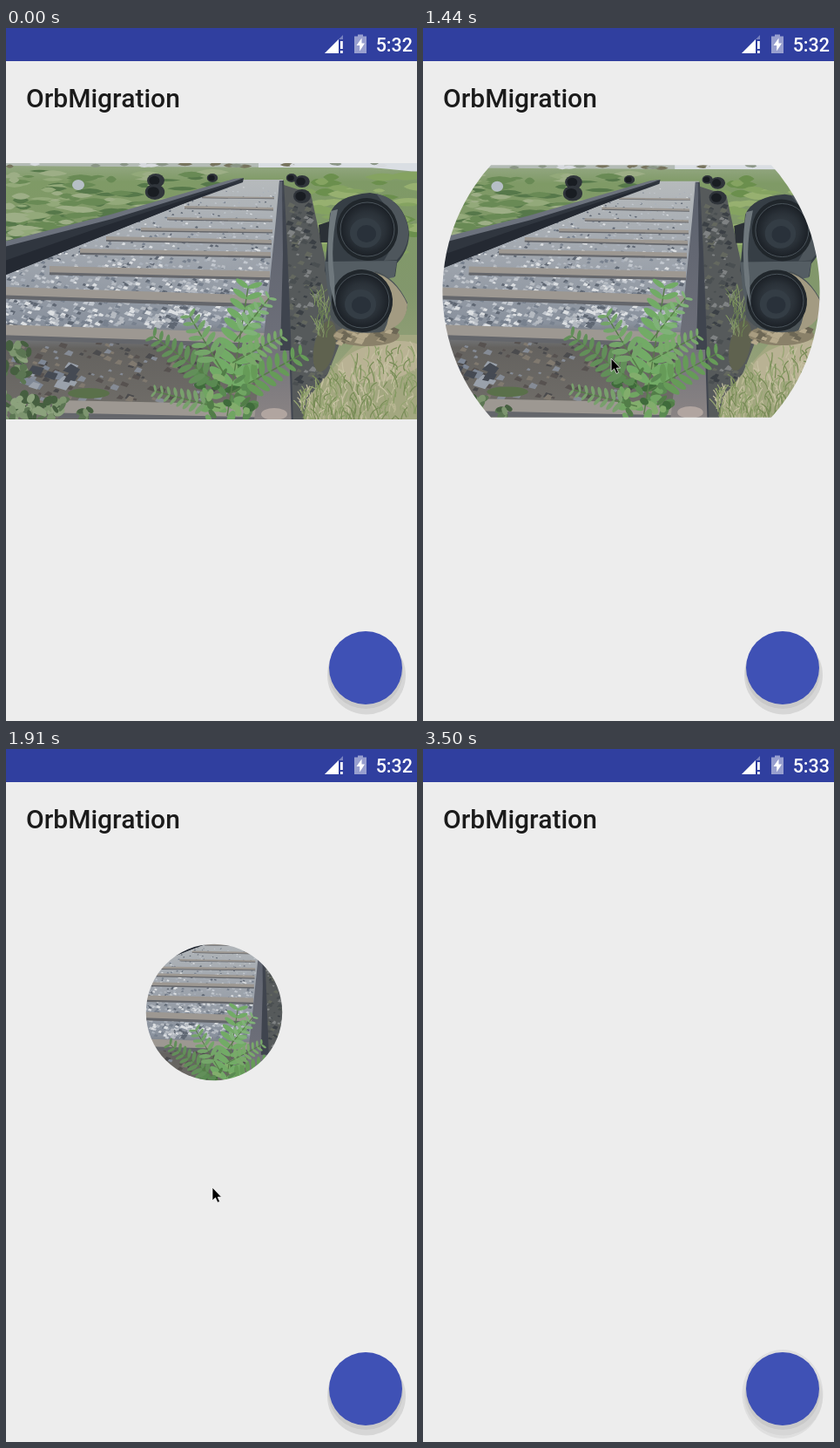
Animation, 472 px wide and 795 px high, one loop 4.02 s. Source, as an HTML page:

```html
<!DOCTYPE html>
<html lang="en">
<head>
<meta charset="utf-8">
<title>OrbMigration</title>
<style>
html, body { margin: 0; width: 100%; height: 100%; overflow: hidden; background: #ededed; }
svg { display: block; width: 472px; height: 795px; }
text { font-family: Roboto, sans-serif; font-weight: 500; }
</style>
</head>
<body>
<svg viewBox="0 0 472 795">
  <defs>
    <clipPath id="frame"><rect y="155" width="472" height="294"/></clipPath>
    <clipPath id="round"><circle id="hole" r="600"/></clipPath>
    <filter id="soft" filterUnits="userSpaceOnUse" x="-10" y="145" width="492" height="314">
      <feGaussianBlur stdDeviation=".7"/>
    </filter>
    <linearGradient id="field" x1="0" y1="0" x2="0" y2="1">
      <stop offset="0" stop-color="#9fae92"/><stop offset=".1" stop-color="#7f9a66"/>
      <stop offset=".5" stop-color="#82976c"/><stop offset="1" stop-color="#a3a884"/>
    </linearGradient>
    <linearGradient id="bed" x1="0" y1="0" x2="0" y2="1">
      <stop offset="0" stop-color="#b6babc"/><stop offset=".3" stop-color="#a0a6ae"/>
      <stop offset=".58" stop-color="#89919d"/><stop offset=".68" stop-color="#64625f"/>
      <stop offset="1" stop-color="#73706b"/>
    </linearGradient>
    <linearGradient id="steel" x1="0" y1="0" x2="0" y2="1">
      <stop offset="0" stop-color="#5b616d"/><stop offset=".6" stop-color="#6c6e78"/>
      <stop offset="1" stop-color="#8d8685"/>
    </linearGradient>
    <radialGradient id="lens">
      <stop offset="0" stop-color="#3a434b"/><stop offset=".65" stop-color="#2a3138"/>
      <stop offset="1" stop-color="#1b2026"/>
    </radialGradient>
  </defs>
  <rect width="472" height="795" fill="#ededed"/>
  <rect width="472" height="38" fill="#303f9f"/>
  <g fill="#fff">
    <path d="M366 29L387 8V13H382V29Z" opacity=".35"/>
    <path d="M366 29L382 13V29ZM384 15h2.800v9H384ZM384 26h2.800v3H384Z"/>
    <path d="M400 9.500h4V7.500h6v2h4V29H400Z" opacity=".5"/>
    <path d="M408.500 11.500L402.500 20H406.200V26.500L412 17.500H408.500Z"/>
    <text id="clock" x="467" y="27" font-size="21.500" text-anchor="end">5:32</text>
  </g>
  <text x="23" y="91" font-size="30" fill="#1b1b1b">OrbMigration</text>
  <g id="ball" clip-path="url(#round)"><g id="zoom"><g clip-path="url(#frame)"><g id="photo" filter="url(#soft)"></g></g></g></g>
  <ellipse id="lift" cx="413" cy="740" rx="46.500" ry="51" opacity="0"/>
  <circle cx="414" cy="742.500" r="45" fill="#d6d6d6"/>
  <circle cx="413" cy="738" r="43" fill="#c9c9c9"/>
  <circle cx="413" cy="734" r="42" fill="#3f51b5"/>
  <path id="cursor" d="M0 0V15L3.500 11.800L6 17.300L8.500 16.200L6.200 11H10.500Z" fill="#000" stroke="#fff" stroke-width=".7"/>
</svg>
<script>
const $ = id => document.getElementById(id);
const photo = $('photo');

let seed = 7;
const rnd = (a = 1, b = 0) => {
  seed = (seed * 16807) % 2147483647;
  return b + (a - b) * seed / 2147483647;
};
const pick = list => list[Math.floor(rnd(list.length))];
const fix = v => v.toFixed(1);

function add(tag, attrs) {
  const el = document.createElementNS('http://www.w3.org/2000/svg', tag);
  for (const k in attrs) el.setAttribute(k, attrs[k]);
  photo.append(el);
}
const shape = (d, fill) => add('path', { d, fill });
const blob = (cx, cy, rx, ry, fill, turn = 0) =>
  add('ellipse', { cx, cy, rx, ry, fill, transform: `rotate(${turn} ${cx} ${cy})` });

// Gathers many small pieces into one path per colour.
function scatter(n, colors, piece, stroke) {
  const paths = colors.map(() => '');
  for (let i = 0; i < n; i++) paths[i % colors.length] += piece();
  paths.forEach((d, i) => add('path', stroke
    ? { d, fill: 'none', stroke: colors[i], 'stroke-width': stroke, 'stroke-linecap': 'round' }
    : { d, fill: colors[i] }));
}

function stone(x, y, s) {
  return `M${fix(x - s)} ${fix(y + rnd(s * .4))}L${fix(x - s * rnd(.5))} ${fix(y - s * .7)}` +
    `L${fix(x + s)} ${fix(y - s * rnd(.4))}L${fix(x + s * .5)} ${fix(y + s * .6)}Z`;
}
const patch = (x, y, w, h) =>
  `M${fix(x)} ${fix(y)}q${fix(w / 2)} ${fix(-h * 1.4)} ${fix(w)} 0q${fix(-w / 2)} ${fix(h * 1.4)} ${fix(-w)} 0`;

function blade(x, y, len) {
  return `M${fix(x)} ${fix(y)}q${fix(rnd(4, -4))} ${fix(-len * .6)} ${fix(rnd(9, -9))} ${fix(-len)}`;
}

// A stem with paired leaflets that shrink towards its tip.
function frond(x0, y0, x1, y1, n, size, fill) {
  const a = Math.atan2(y1 - y0, x1 - x0), deg = a * 180 / Math.PI;
  add('path', { d: `M${x0} ${y0}L${x1} ${y1}`, stroke: '#587c4a', 'stroke-width': 1.5 });
  for (let i = 0; i <= n; i++) {
    const k = .25 + .75 * i / n, s = size * (1.1 - .6 * k);
    for (const side of [-1, 1]) {
      const b = a + side * 1.1;
      blob(x0 + (x1 - x0) * k + Math.cos(b) * s, y0 + (y1 - y0) * k + Math.sin(b) * s,
        s, s * .36, fill, deg + side * 63);
    }
  }
}

function drawPhoto() {
  add('rect', { x: -10, y: 145, width: 492, height: 314, fill: 'url(#field)' });
  shape('M-10 145H482V161L350 160L120 159L-10 158Z', '#b3bbb5');
  shape('M290 145H482V166L420 160H290Z', '#dadee3');
  scatter(20, ['#77745e', '#8b9687', '#d7dade'], () => patch(rnd(460), rnd(159, 155), rnd(18, 5), 3));
  scatter(150, ['#56784a', '#93a97a', '#698a55', '#9dae86'], () => {
    const y = rnd(245, 164);
    return patch(rnd(270 - (y - 164) * 2.6, -10), y, rnd(40, 12), rnd(6, 2));
  });
  scatter(70, ['#6b8f4d', '#97b070', '#85a361'], () => patch(rnd(460, 340), rnd(260, 168), rnd(44, 14), rnd(8, 3)));
  blob(83, 180, 7, 6, '#b6bfc6');

  shape('M271 174H318L326 459H-10V270L120 226Z', 'url(#bed)');
  scatter(1100, ['#c3c8cf', '#5f6773', '#a9b0ba', '#78818e', '#dcdfe2', '#b5bac1'], () => {
    const y = 177 + 166 * Math.sqrt(rnd()), left = Math.max(-4, 268 - (y - 178) * 2.65);
    return stone(rnd(313 - (y - 175) * .1, left), y, .8 + (y - 175) / 52 * rnd(1.2, .6));
  });
  scatter(150, ['#4b4b4d', '#80796f', '#858b95', '#575250'], () => stone(rnd(290), rnd(430, 360), rnd(6, 2)));
  scatter(20, ['#7e8795', '#9aa1ab', '#454a53'], () => stone(rnd(80, 8), rnd(415, 375), rnd(10, 4)));

  // Sleepers: left end, top at the left, right end, top at the right, thickness.
  const beams = [[225, 193, 308, 194, 2], [205, 204, 307, 206, 3], [185, 217, 306, 219, 3],
    [155, 229, 306, 231, 4], [115, 239, 305, 243, 5], [85, 253, 304, 257, 6],
    [50, 273, 303, 279, 9], [0, 297, 302, 307, 12], [-10, 340, 298, 350, 15], [60, 427, 290, 432, 18]];
  for (const [x, y, x2, y2, h] of beams) {
    shape(`M${x} ${y}L${x2} ${y2}v${h}L${x} ${y + h}Z`, '#9d9892');
    shape(`M${x} ${y + h * .8}L${x2} ${y2 + h * .8}v${h * .35}L${x} ${y + h * 1.15}Z`, '#64666b');
  }
  blob(95, 419, 24, 6, '#5a704a');

  shape('M273 172L262 174L120 215L-10 250V287L110 239L200 203L272 177Z', '#30363f');
  shape('M273 172L262 173L120 214L-10 247V253L122 219L262 176Z', '#6c727d');
  shape('M-10 270L110 228L270 176L200 203L110 239L-10 287Z', '#242932');

  shape('M319 180L350 190L374 300L388 350L345 459H325Z', '#565a5b');
  scatter(150, ['#3b4045', '#7f8283', '#64685f', '#4a4f51'], () => {
    const y = rnd(420, 195);
    return stone(rnd(348 + (y - 200) * .12, 325), y, rnd(5, 1.5));
  });
  shape('M314 175H319L323 250L327 350L330 459H313L309 340L312 240Z', '#414650');
  shape('M314 175L317 176L321 260L325 360L328 459H284L292 390L302 300L310 220Z', 'url(#steel)');
  shape('M317 178L322 260L327 370H315L318 260Z', '#3f444e');
  blob(308, 443, 15, 7, '#b1a5a0');

  shape('M340 459L346 425L380 385L410 352H482V459Z', '#a3a780');
  blob(432, 383, 52, 22, '#b9b294', -12);
  blob(366, 365, 12, 30, '#5f624f', 12);
  scatter(330, ['#bab894', '#879b64', '#c6c1a2', '#96a572', '#788c56'], () => {
    const x = rnd(472, 338);
    return blade(x, rnd(456, Math.max(372, 425 - (x - 338) * .6)), rnd(18, 6));
  }, 1.2);
  scatter(34, ['#6f8853', '#859868'], () => blade(rnd(372, 354), rnd(355, 310), rnd(26, 9)), 1);

  for (const [x, y, r] of [[172, 175, 8], [171, 188, 9], [237, 172, 5], [340, 176, 7], [340, 193, 8], [328, 172, 5]]) {
    blob(x, y, r * 1.25, r, '#30353b');
    blob(x - r * .2, y, r * .75, r * .65, '#191d22');
  }

  blob(414, 353, 38, 12, '#8a8169');
  scatter(24, ['#a89c80', '#6d6755', '#b5a98c'], () => stone(rnd(446, 380), rnd(362, 346), rnd(7, 3)));
  shape('M359 226L371 222V246H361Z', '#2b3036');
  shape('M372 213Q380 192 418 189Q452 193 461 224Q468 248 449 270L447 285L372 297L366 278Z', '#363e45');
  shape('M425 190Q452 195 461 225Q466 248 449 266L434 267Q452 240 442 212Z', '#4e565c');
  shape('M366 268L449 267L446 286L398 294L374 322L369 300Z', '#545d63');
  shape('M425 279Q447 286 461 315Q461 340 430 349Q382 354 372 329L374 300Z', '#4b5357');
  shape('M421 280Q447 286 461 317Q460 341 434 348Q451 315 421 280Z', '#a39b82');
  for (const [x, y] of [[415, 231], [409, 313]]) {
    blob(x, y, 35, 36, '#20262b', -15);
    add('circle', { cx: x, cy: y, r: 31, fill: 'url(#lens)', stroke: '#4b545b', 'stroke-width': 1 });
    blob(x - 2, y + 4, 18, 17, '#343d45');
    blob(x - 1, y + 5, 11, 10, '#29313a');
  }
  shape('M373 210Q367 250 372 295L378 320L377 285Q372 250 381 208Z', '#6f787d');

  const greens = ['#5a8a52', '#70a562', '#3f6b3b', '#527d48', '#82ad6c'];
  for (let i = 0; i < 46; i++)
    blob(rnd(284, 222), rnd(449, 382), rnd(10, 4), rnd(5, 2.5), pick(greens), rnd(180));
  frond(254, 445, 278, 298, 9, 17, '#72ab66');
  frond(248, 412, 170, 354, 8, 11, '#628f59');
  frond(250, 396, 211, 331, 6, 11, '#74a569');
  frond(256, 420, 338, 375, 7, 12, '#669b58');
  frond(260, 384, 316, 354, 6, 9, '#79a96a');
  frond(246, 436, 172, 417, 7, 8, '#78a06c');
  frond(262, 360, 302, 310, 5, 9, '#80b278');
  for (let i = 0; i < 14; i++)
    blob(rnd(276, 232), rnd(449, 395), rnd(8, 4), rnd(4, 2), pick(greens), rnd(180));

  const leaves = ['#5c7653', '#7d956f', '#465f40', '#8ca27d'];
  for (let i = 0; i < 55; i++) blob(rnd(66, -4), rnd(449, 421), rnd(9, 4), rnd(5, 2), pick(leaves), rnd(180));
  for (let i = 0; i < 28; i++) blob(rnd(28, -4), rnd(410, 362), rnd(9, 4), rnd(5, 2), pick(leaves), rnd(180));
  for (let i = 0; i < 8; i++) blob(rnd(100, 84), rnd(449, 435), 5, 3, pick(leaves), rnd(180));
}

const LOOP = 4020, STEP = 1000 / 17;
const clamp = v => Math.min(1, Math.max(0, v));
const ease = u => (1 - Math.cos(Math.PI * clamp(u))) / 2;
const bezier = (a, b, c, u) => a * (1 - u) ** 2 + 2 * b * u * (1 - u) + c * u * u;

// Pointer stops: time, x, y.
const stops = [[500, 146, 835], [660, 124, 680], [780, 114, 570], [880, 160, 480],
  [980, 236, 395], [1080, 218, 347], [1340, 218, 347], [1560, 214, 416],
  [1700, 222, 459], [1880, 237, 503], [2560, 237, 503], [2800, 281, 565],
  [2970, 307, 606], [3029, 311, 613], [3220, 300, 680], [3430, 273, 800]];

function along(keys, t) {
  const i = keys.findIndex(k => k[0] > t);
  if (i < 1) return null;
  const [t0, x0, y0] = keys[i - 1], [t1, x1, y1] = keys[i];
  const u = (t - t0) / (t1 - t0);
  return [x0 + (x1 - x0) * u, y0 + (y1 - y0) * u];
}

function render(now) {
  const t = 560 + Math.floor((now % LOOP - 553) / STEP) * STEP;

  const radius = t < 1375 ? 600 : Math.max(19.5, 182 - .294 * (t - 1560));
  const scale = 1 - .65 * ease((t - 1318) / 1300);
  const move = ease((t - 2164) / 1298);
  const x = bezier(239, 371, 413, move), y = bezier(302, 520, 734, move);
  const hole = $('hole');
  hole.setAttribute('cx', x);
  hole.setAttribute('cy', y);
  hole.setAttribute('r', radius);
  $('zoom').setAttribute('transform',
    `translate(${x - 3} ${y}) scale(${scale}) translate(-236 -302)`);
  $('ball').setAttribute('visibility', t < 3480 ? 'visible' : 'hidden');
  $('lift').setAttribute('opacity', t > 3480 ? .06 : 0);
  $('clock').textContent = t < 2700 ? '5:32' : '5:33';

  const p = t < 555 ? null : along(stops, t);
  $('cursor').setAttribute('visibility', p ? 'visible' : 'hidden');
  if (p) $('cursor').setAttribute('transform', `translate(${fix(p[0])} ${fix(p[1])})`);
}

drawPhoto();
const start = performance.now();
function tick() {
  render(performance.now() - start);
  requestAnimationFrame(tick);
}
tick();
</script>
</body>
</html>
```
